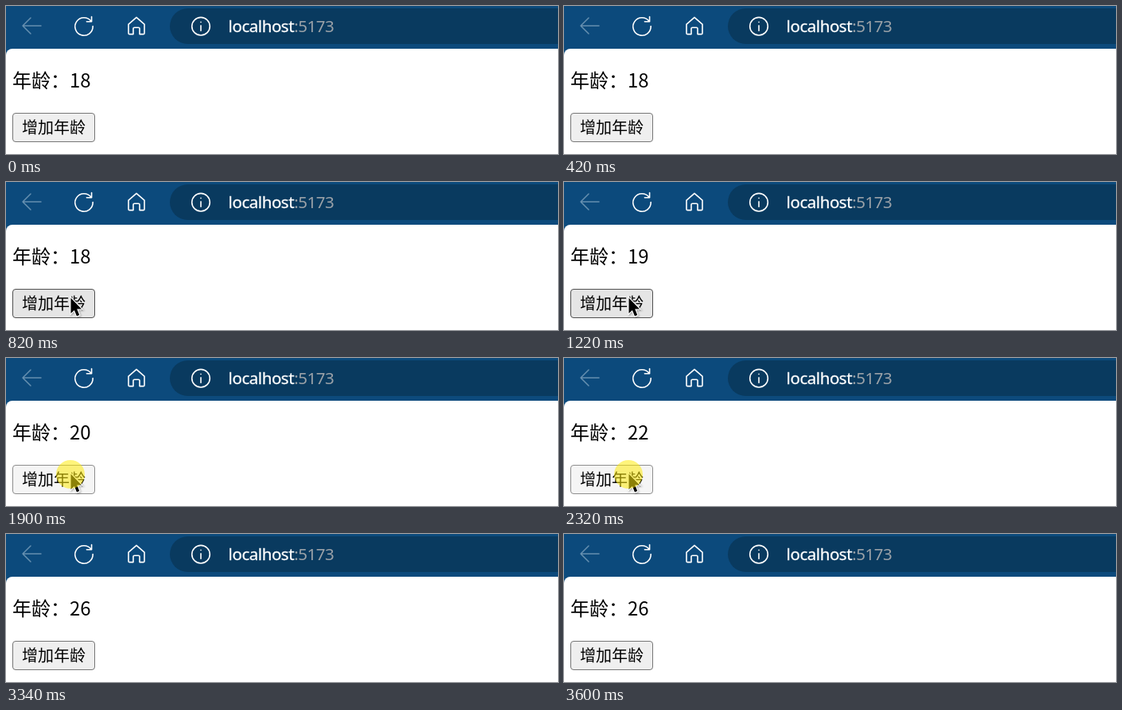
An HTML page for the animation above (3.62 s loop, 694 px wide and 187 px high).

```html
<!DOCTYPE html>
<html lang="zh-CN">
<head>
<meta charset="utf-8">
<title>localhost:5173</title>
<style>
  html, body { margin: 0; width: 100%; height: 100%; overflow: hidden; background: #fff; }
  svg { display: block; }
  .zh { font-family: "Noto Sans CJK SC", "Noto Sans CJK", sans-serif; font-weight: 350; fill: #000; }
  .url { font: 20.5px "Noto Sans", "Open Sans", sans-serif; letter-spacing: -.45px; fill: #fff; stroke: #fff; stroke-width: .3; }
  .port { fill: #9ba2a8; stroke: none; }
  .icon { fill: none; stroke: #fff; stroke-width: 1.6; stroke-linecap: round; stroke-linejoin: round; }
  #button { fill: #efefef; stroke: #767676; }
  #button.hover { fill: #e5e5e5; stroke: #4f4f4f; }
  #button.active { fill: #f5f5f5; stroke: #8d8d8d; }
  #arrow { fill: #000; stroke: #fff; stroke-width: 2.4; paint-order: stroke; filter: drop-shadow(1px 1px 1px rgba(0, 0, 0, .3)); }
</style>
</head>
<body>
<svg width="694" height="187" viewBox="0 0 694 187">
  <rect width="694" height="70" fill="#0c4a7c"/>
  <rect x="206" y="3" width="520" height="45" rx="22.5" fill="#093a5f"/>
  <rect y="54" width="720" height="150" rx="8" fill="#fff"/>

  <g class="icon">
    <path d="M44 25H21M31 15L21 25L31 35" stroke="#6690b0" stroke-width="1.5"/>
    <path d="M107 19.3A11.2 11.2 0 1 0 109.2 25.5M107.6 13.6V19.8H101.4"/>
    <path d="M154 23.2L164 14.3L174 23.2V34.2Q174 35.6 172.6 35.6H168V28.6Q168 27.2 166.6 27.2H161.4Q160 27.2 160 28.6V35.6H155.4Q154 35.6 154 34.2Z"/>
    <circle cx="245" cy="25.7" r="11.3"/>
    <path d="M245 24.7V31.2M245 20.3V20.4"/>
  </g>
  <text class="url" x="279.6" y="33">localhost<tspan class="port">:5173</tspan></text>

  <text class="zh" id="age" x="8" y="103" font-size="24"></text>
  <rect id="button" x="8.5" y="135.5" width="103" height="36" rx="3.5"/>
  <text class="zh" x="20" y="161" font-size="20">增加年龄</text>

  <g id="pointer">
    <path id="arrow" d="M.5 1V20.5L4.9 16.4L8 24L11.2 22.6L8.2 15H14Z"/>
    <circle id="glow" cy="1.5" r="18" fill="#ffec10" fill-opacity=".55"/>
  </g>
</svg>
<script>
const LOOP = 3620, STEP = 20;
const $ = id => document.getElementById(id);
const age = $('age'), button = $('button'), pointer = $('pointer'), glow = $('glow');

const entry = { x: 293, y: 191.5 }, rest = { x: 81, y: 145.5 }, exit = { x: 150, y: 195 };

// alternating press and release times
const toggles = [1040, 1220, 1380, 1480, 1900, 2020, 2120, 2220, 2320, 2420, 2580, 2760, 2860, 2960, 3040, 3140];

const progress = (t, from, to) => Math.min(1, Math.max(0, (t - from) / (to - from)));
const mix = (a, b, k) => ({ x: a.x + (b.x - a.x) * k, y: a.y + (b.y - a.y) * k });

// slows down towards the button, speeds up on the way out
function tipAt(t) {
  const arrive = progress(t, 500, 820), leave = progress(t, 3180, 3320);
  return leave ? mix(rest, exit, leave ** 2) : mix(rest, entry, (1 - arrive) ** 2);
}

function draw(ms) {
  const t = Math.floor(ms % LOOP / STEP) * STEP;
  const { x, y } = tipAt(t);
  const count = toggles.filter(time => t >= time).length;
  const pressed = count % 2 === 1;
  const inside = x >= 8 && x < 112 && y >= 135 && y < 172;

  pointer.setAttribute('transform', `translate(${x} ${y})`);
  glow.setAttribute('visibility', pressed ? 'visible' : 'hidden');
  button.setAttribute('class', pressed ? 'active' : inside ? 'hover' : '');
  age.textContent = '年龄：' + (18 + Math.floor(count / 2));
}

const start = performance.now();
function tick() {
  draw(performance.now() - start);
  requestAnimationFrame(tick);
}
tick();
</script>
</body>
</html>
```
